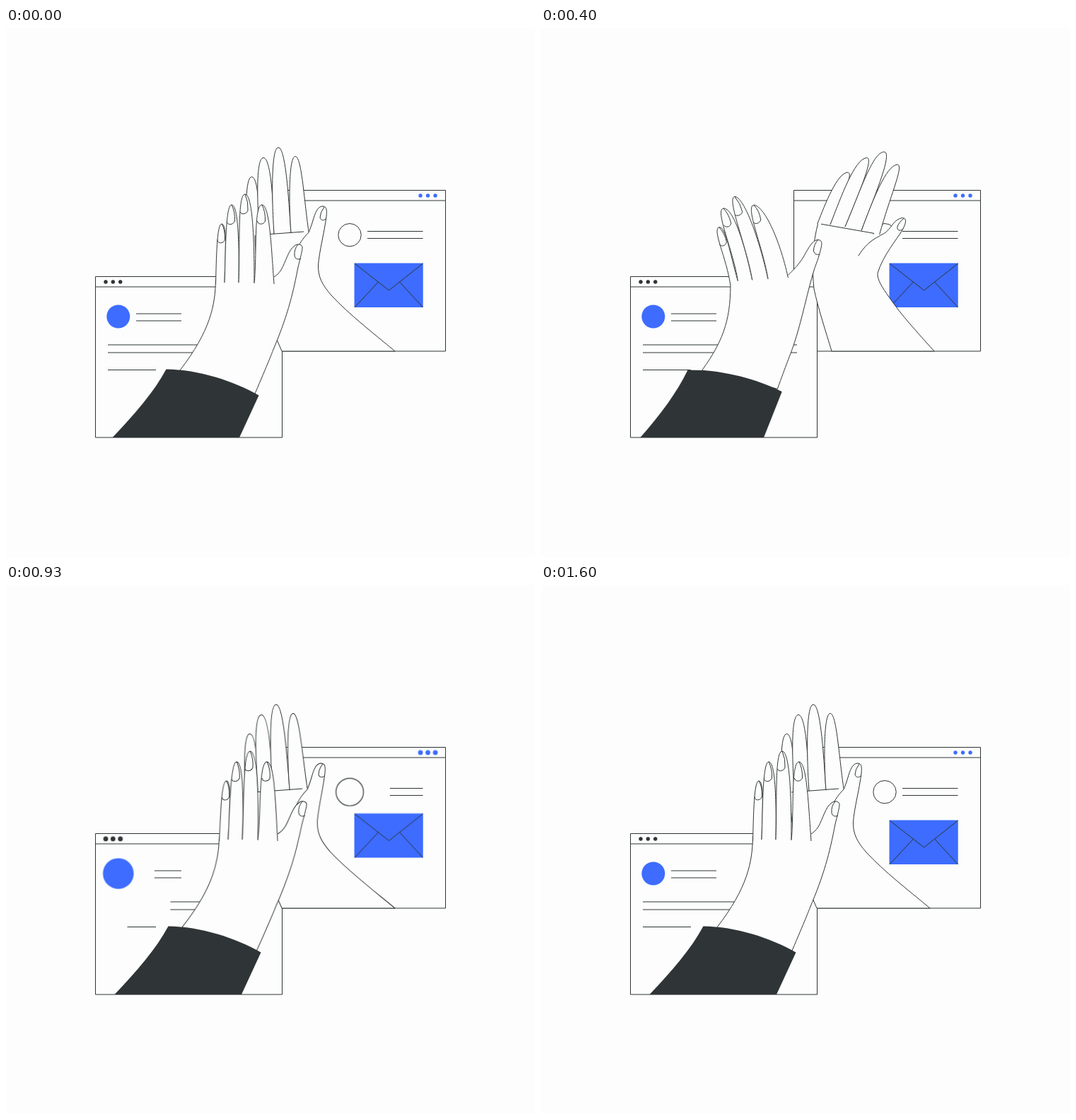
Animation, 748 px wide and 748 px high, one loop 1670 ms. Source, as an HTML page without scripts:

```html
<!DOCTYPE html>
<html lang="en">
<head>
<meta charset="utf-8">
<title>High five</title>
<style>
  :root { --ink: #2f3436; --paper: #fcfdfc; --blue: #3d6cff; --loop: 1.67s linear infinite; }
  html, body { margin: 0; width: 100%; height: 100%; overflow: hidden; background: var(--paper); }
  svg { display: block; width: 100vw; height: 100vh; fill: var(--paper); stroke: var(--ink); stroke-width: 1; stroke-linejoin: round; }
  .blue { fill: var(--blue); stroke: none; }
  .dark { fill: var(--ink); stroke: none; }
  .line { fill: none; }

  /* --a touching, --b apart, --c bent back, --d impact */
  .pose { d: var(--a); animation: pose var(--loop); }
  .front { animation: front-sway var(--loop); }
  .back { animation: back-sway var(--loop); }
  .lean-front { transform-origin: 0 485px; animation: lean-front var(--loop); }
  .lean-back { transform-origin: 0 457px; animation: lean-back var(--loop); }
  .text path { stroke-dasharray: 1 2; animation: rewrite var(--loop); }
  .hop { animation: hop var(--loop); }
  .pulse, .ring, .dots circle { transform-box: fill-box; transform-origin: center; }
  .pulse { animation: pulse var(--loop); }
  .ring { animation: ring var(--loop); }
  .dots circle { animation: dots var(--loop); }

  @keyframes pose {
    0% { d: var(--a); animation-timing-function: cubic-bezier(.4, .1, .8, .8); }
    16.2% { d: var(--b); animation-timing-function: cubic-bezier(.3, .3, .6, 1); }
    31.7% { d: var(--c); animation-timing-function: cubic-bezier(.4, .1, .6, 1); }
    43.7% { d: var(--d); animation-timing-function: ease-in-out; }
    55.7%, 100% { d: var(--a); }
  }
  @keyframes front-sway {
    0%, 100% { transform: translateX(-3px); }
    16.2%, 31.7%, 95.8% { transform: none; }
    24% { transform: translateX(-5px); }
  }
  @keyframes back-sway {
    0%, 16.2%, 31.7%, 100% { transform: none; }
    24% { transform: translateX(4px); }
  }
  @keyframes lean-front {
    0%, 43.7%, 67.7%, 100% { transform: skewX(0deg); }
    55.7% { transform: skewX(-1deg); }
  }
  @keyframes lean-back {
    0%, 43.7%, 67.7%, 100% { transform: skewX(0deg); }
    55.7% { transform: skewX(.62deg); }
  }
  @keyframes rewrite {
    0%, 43.7% { stroke-dashoffset: 0; animation-timing-function: ease-in; }
    55.7% { stroke-dashoffset: -.4; }
    61% { stroke-dashoffset: -1; }
    61.01% { stroke-dashoffset: 1; }
    67.7% { stroke-dashoffset: .69; animation-timing-function: ease-out; }
    84%, 100% { stroke-dashoffset: 0; }
  }
  @keyframes hop {
    0%, 40% { transform: none; }
    43.7% { transform: translateY(-3px); animation-timing-function: ease-out; }
    55.7% { transform: translateY(-9.5px); animation-timing-function: ease-in; }
    67.7% { transform: translateY(-6.5px); animation-timing-function: ease-out; }
    85%, 100% { transform: none; }
  }
  @keyframes pulse {
    0%, 43.7% { transform: scale(1); }
    55.7% { transform: scale(1.32); animation-timing-function: ease-in-out; }
    67.7% { transform: scale(.89); animation-timing-function: ease-in-out; }
    85%, 100% { transform: scale(1); }
  }
  @keyframes ring {
    0%, 40% { transform: scale(1); }
    43.7% { transform: scale(1.08); animation-timing-function: ease-out; }
    55.7% { transform: scale(1.2); animation-timing-function: ease-in-out; }
    67.7% { transform: scale(.93); animation-timing-function: ease-in-out; }
    85%, 100% { transform: scale(1); }
  }
  @keyframes dots {
    0%, 43.7%, 67.7%, 100% { transform: scale(1); }
    55.7% { transform: scale(1.25); }
  }
</style>
</head>
<body>
<svg viewBox="0 0 748 748">
  <!-- back window -->
  <path d="M357.5 229.5H621.5V457H357.5ZM357.5 244H621.5"/>
  <g class="dots blue"><circle cx="586" cy="237" r="2.7"/><circle cx="596.5" cy="237" r="2.7"/><circle cx="607" cy="237" r="2.7"/></g>
  <circle class="ring" cx="486" cy="292.7" r="16.2"/>
  <g class="text">
    <path pathLength="1" d="M511 287.5H589.5"/>
    <path pathLength="1" d="M511 297.5H589.5"/>
  </g>
  <g class="hop">
    <rect class="blue" x="492.5" y="332.5" width="97.2" height="62.5"/>
    <path class="line" d="M493 333L541.5 371L589.5 333M493 395L526.5 359M589.5 395L556.5 359"/>
  </g>

  <!-- front window -->
  <path d="M126.5 351.5H390.5V579H126.5ZM126.5 366H390.5"/>
  <g class="dots dark"><circle cx="141" cy="359" r="2.7"/><circle cx="151.3" cy="359" r="2.7"/><circle cx="161.7" cy="359" r="2.7"/></g>
  <circle class="pulse blue" cx="158.8" cy="408" r="16.5"/>
  <g class="text">
    <path pathLength="1" d="M184 404H248"/>
    <path pathLength="1" d="M184 414H248"/>
    <path pathLength="1" d="M144 448H362"/>
    <path pathLength="1" d="M144 459H362"/>
    <path pathLength="1" d="M144 483.5H212"/>
  </g>

  <!-- back hand: palm and thumb, fingers, creases, nail -->
  <g class="back"><g class="lean-back">
    <path class="pose" style="
      --a:path('M352 293C352 340 365 390 377 427C381 437 386 447 390 457L550 457C520 432 485 405 460 378C447 363 441 352 441.5 335C443 315 450 290 453 266C454 256 453 252 447 252C440 253 437 262 434 272C432 279 430 284 428 289');
      --b:path('M385 282C373 315 376 340 384 367C392 395 404 427 413 457L562 457C537 432 510 405 490 379C479 366 473 352 474 340C478 316 488 290 493 275C498 262 498 256 491 256C484 258 482 266 478 273C474 280 472 284 468 289');
      --c:path('M390 270C383 300 380 335 381 370C386 398 396 430 404 457L547 457C524 430 502 405 487 381C478 367 470 357 471 350C480 325 505 303 514 291C521 280 521 274 513 275C503 278 499 284 494 289C489 294 483 296 478 296');
      --d:path('M348 293C348 340 362 390 375 430C378 440 381 449 384 457L547 457C515 432 478 405 455 378C441 363 436 352 435 340C438 322 448 290 452 268C453 257 451 254 446 255C437 257 433 268 430 277C428 283 425 287 421 289')"/>
    <path class="pose" style="
      --a:path('M340 293C339 265 338 210 347.5 210.5C356 211 358 250 358 293');
      --b:path('M382 290C385 262 394 203 404 202.5C411 203 405 225 397 284');
      --c:path('M389 271C405 240 425 207 442 205C451 205 440 225 409 275');
      --d:path('M336 293C335 265 334 211 343 211C352 211 354 250 354 293')"/>
    <path class="pose" style="
      --a:path('M358 293C356 255 352 184 364 183.5C375 184 378 250 379 291');
      --b:path('M397 284C402 250 413 178 425 177.5C432 178 428 210 418 285');
      --c:path('M409 275C430 232 452 190 472 186.5C482 185 468 215 430 279');
      --d:path('M354 293C352 255 348 185 360 184C371 185 374 250 373 291')"/>
    <path class="pose" style="
      --a:path('M379 291C376 250 374 169 385 169C396 169 400 250 403 290');
      --b:path('M418 285C424 250 433 165 447 165.5C456 166 450 215 441 287');
      --c:path('M430 279C458 225 480 182 498 180C511 180 487 225 453 286');
      --d:path('M373 291C371 250 370 170 381 169.5C392 170 395 250 396 290')"/>
    <path class="pose" style="
      --a:path('M403 290C400 255 399 182 409 181.5C418 182 421 240 428 288');
      --b:path('M441.5 287C449 250 458 181 468 181.5C478 182 471 225 468 288');
      --c:path('M453 286C475 235 497 203 515 199C527 197 500 240 478 294');
      --d:path('M395 290C396 255 395 182 405 182C414 182 416 240 422 288')"/>
    <path class="pose line" style="
      --a:path('M354 293L421 288M428 289C421 296 416 303 413 310');
      --b:path('M384 283.5L460 287M468 289C458 297 448 308 442 323');
      --c:path('M396 274L470 292M478 297C465 301 455 310 446 322');
      --d:path('M350 293L414 288.5M421 289C412 298 406 310 401 325')"/>
    <path class="pose line" style="
      --a:path('M450 253Q444 261 444 268C445 272 449 273 452 270');
      --b:path('M494 257Q488 264 487 271C488 276 492 276 495 271');
      --c:path('M517 275Q508 281 506 288C507 293 511 293 515 290');
      --d:path('M449 255Q444 262 443 270C444 274 448 275 451 272')"/>
  </g></g>

  <!-- front hand: palm and thumb, thumbnail, fingers with nails, sleeve -->
  <g class="front">
    <g class="lean-front">
      <path class="pose" style="
        --a:path('M299.5 355C299 392 292 428 249 484L355 517C373 475 379 460 380 457C400 410 408 380 416 338C419 326 421 318 422 312C423 306 416 304 411 308C402 314 399 330 392 342C389 347 385 350 382 352');
        --b:path('M274.5 350C275 400 262 440 230 484L336 511C350 476 357 460 361 450C373 418 381 382 391 343C395 328 397 318 399 309C401 301 393 300 388 305C380 312 376 327 369 336C364 343 360 347 357 350');
        --c:path('M272 358C273 410 268 437 234 484L341 510C352 477 358 462 362 450C375 410 383 362 393 336C398 325 401 317 403 307C405 297 396 296 390 302C383 310 378 322 371 330C364 339 358 344 353 349');
        --d:path('M303 350C302 405 290 438 254 484L358 518C375 480 383 462 384 457C405 410 411 385 418 345C421 330 424 320 425.5 314C427 304 418 304 414 309C406 316 401 333 394 343C391 347 388 350 385 353')"/>
      <path class="pose line" style="
        --a:path('M416 306Q410 313 411 322C412 327 416 328 420 326');
        --b:path('M395 301Q388 308 389 317C390 322 394 323 397 321');
        --c:path('M398 298Q392 305 391 314C393 320 397 320 400 319');
        --d:path('M420 306Q414 313 415 321C416 327 420 328 422 327')"/>
      <path class="pose" style="
        --a:path('M299.5 362C300.5 325 301 277 308 277C316 277 313 320 312 360M308 277Q313 285 312.5 299C311 305 302 306 302 299');
        --b:path('M275 357C272 325 264 276 274 276C283 277 284 310 286 357M274 276Q280 284 281 298C280 304 271 305 270 301');
        --c:path('M271.5 366C265 325 238 290 248 284.5C258 283 264 315 282 358M248 284.5Q257 293 260.5 305C259 311 252 312 251 308');
        --d:path('M303 361C303 325 301 279 308 279C316 280 315 320 315 361M308 279Q314 287 313.5 300C312 307 303 307 302.5 302')"/>
      <path class="pose" style="
        --a:path('M312 360C313.5 320 313 250 322 250C331 250 333 300 332 360M322 250Q327 260 326.5 273C324 279 316 279 315.5 274');
        --b:path('M286 357C285 320 274 250 285 249C296 249 305 300 307 357M285 249Q291 258 292 271C291 277 282 278 281 275');
        --c:path('M282 358C272 310 238 260 252 258C266 257 285 300 302 356M252 258Q261 267 264.5 279C263 284 258 285 255 281');
        --d:path('M315 360C316 320 312 252 321 252C331 253 333 300 335 360M321 252Q326 262 326 274C324 280 316 280 315.5 276')"/>
      <path class="pose" style="
        --a:path('M332 360C334 310 330 235 341 235C352 236 354 300 354 360M341 235Q346 246 345 258C343 264 335 264 334.5 260');
        --b:path('M307 357C305 310 293 233 304 233C315 234 326 300 329 357M304 233Q309 244 310 255C309 261 300 262 299 259');
        --c:path('M302 356C290 305 254 245 266 241C281 241 308 300 324.5 354M266 241Q276 250 279.5 262C278 268 272 268 270 267');
        --d:path('M335 360C335 310 330 236 340 236C351 237 356 300 358 360M340 236Q345 247 344.5 259C342 265 335 265 334.5 261')"/>
      <path class="pose" style="
        --a:path('M354 361C358 320 353 250 365 250C376 251 378 310 382 362M365 250Q370 260 369.5 273C368 278 359 279 358.5 273');
        --b:path('M329 357C328 320 316 247 327 247C339 248 352 310 357 357M327 247Q333 256 334 269C333 275 324 275 323 273');
        --c:path('M324.5 354C314 305 282 255 295 252C310 252 337 290 353 351M295 252Q304 259 306.5 272C305 278 299 279 297 276');
        --d:path('M358 361C359 320 353 251 363 251C375 252 379 310 385 362M363 251Q369 261 368.5 274C367 279 358 280 357.5 275')"/>
    </g>
    <path class="pose dark" style="
      --a:path('M229.5 482.5C275 483 325 499 360.5 519.5L333 579L153.5 579C185 546 212 515 229.5 482.5');
      --b:path('M209 483.5C255 482 305 496 342 515.5L316 579L140 579C170 546 192 515 209 483.5');
      --c:path('M214 484C260 482 312 496 347.5 513.5L322 579L148 579C177 546 200 515 214 484');
      --d:path('M233.5 482.5C280 483 330 500 364 520.5L336.5 579L155 579C188 546 217 515 233.5 482.5')"/>
  </g>
</svg>
</body>
</html>
```
